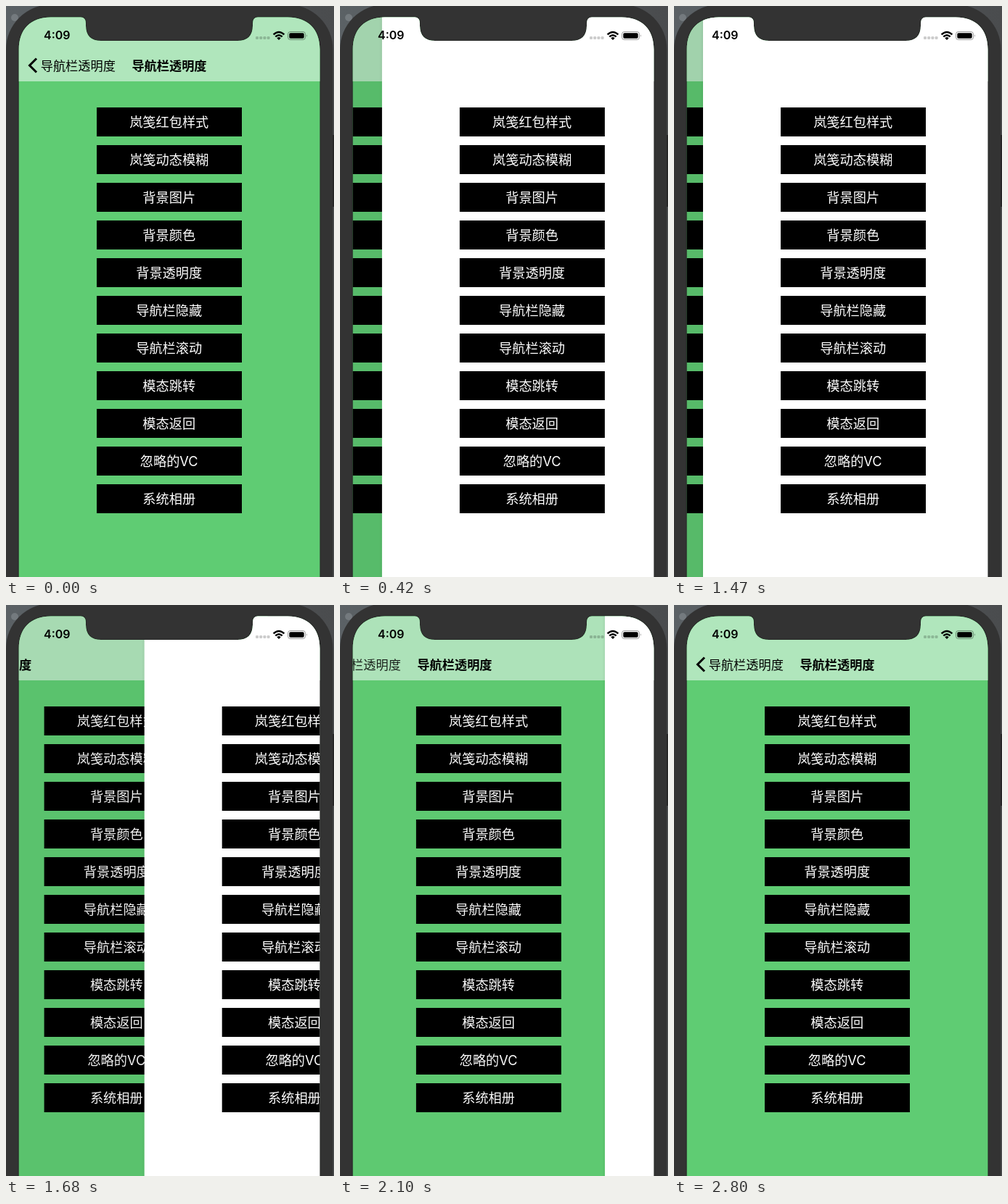
Animation, 452 px wide and 788 px high, one loop 2870 ms. Source, as an HTML page:

```html
<!DOCTYPE html>
<html lang="zh">
<head>
<meta charset="utf-8">
<title>Navigation transition</title>
<style>
  html, body { margin: 0; width: 100%; height: 100%; overflow: hidden; background: #4d5257; }
  svg { display: block; width: 100%; height: 100%; }
  text { font-family: Inter, "Noto Sans CJK SC", "Noto Sans CJK", sans-serif; }
  .button text { font-size: 18.2px; fill: #fff; text-anchor: middle; }
  .bar text { font-size: 17.2px; }
  .bar .title { font-weight: 700; text-anchor: middle; }
  .clock { font: 600 16px Inter, sans-serif; }
</style>
</head>
<body>
<svg viewBox="0 0 452 788">
  <defs>
    <linearGradient id="desk">
      <stop offset="0" stop-color="#5b6165"/>
      <stop offset="1" stop-color="#4a4c4e"/>
    </linearGradient>
    <linearGradient id="shade">
      <stop offset="0" stop-opacity="0"/>
      <stop offset="1" stop-opacity=".05"/>
    </linearGradient>
    <path id="outline" d="M17.7 800V60C17.7 32 34 15.5 62 15.5H103Q110 15.5 110 24V27Q110 48 131 48H319Q340 48 340 27V24Q340 15.5 347 15.5H388C416 15.5 432.5 32 432.5 60V800Z"/>
    <clipPath id="screen"><use href="#outline"/></clipPath>
    <g id="buttons"></g>
  </defs>

  <rect width="452" height="788" fill="url(#desk)"/>
  <circle cx="12" cy="16" r="5" fill="#747a7e"/>
  <rect x="449" y="178" width="3" height="99" fill="#222"/>
  <rect x="0" y="-2" width="450.5" height="860" rx="62" fill="#333"/>
  <use href="#outline" fill="none" stroke="#262826" stroke-width="2"/>

  <g clip-path="url(#screen)">
    <g id="greenPage">
      <rect x="17" width="416" height="788" fill="#5fcc73"/>
      <use href="#buttons"/>
    </g>
    <rect x="17" width="416" height="104" fill="#b0e6bc"/>
    <g id="barItems" class="bar">
      <g id="backItem">
        <path d="M42 72.5L32.5 82L42 91.5" fill="none" stroke="#000" stroke-width="3"/>
        <text x="47.7" y="88.5">导航栏透明度</text>
      </g>
      <text class="title" x="225" y="88.5">导航栏透明度</text>
    </g>
    <rect id="dim" x="17" width="416" height="788"/>
    <g id="whitePage">
      <rect x="14" width="4" height="788" fill="url(#shade)"/>
      <rect x="18" width="415" height="788" fill="#fff"/>
      <use href="#buttons"/>
    </g>
  </g>

  <text class="clock" x="52" y="46.3">4:09</text>
  <g fill-opacity=".2">
    <rect x="344" y="42" width="4" height="4" rx="1.3"/>
    <rect x="349.2" y="42" width="4" height="4" rx="1.3"/>
    <rect x="354.4" y="42" width="4" height="4" rx="1.3"/>
    <rect x="359.6" y="42" width="4" height="4" rx="1.3"/>
  </g>
  <g fill="none" stroke="#000" stroke-width="2.4">
    <path d="M368.6 39.4Q376 32.4 383.4 39.4"/>
    <path d="M371.3 42.4Q376 38 380.7 42.4"/>
  </g>
  <path d="M373.3 44.2Q376 42 378.7 44.2L376 47Z"/>
  <rect x="388.5" y="35.5" width="24" height="11" rx="3.3" fill="none" stroke="#000" stroke-opacity=".38"/>
  <rect x="390.3" y="37.3" width="20.4" height="7.4" rx="1.8"/>
  <path d="M414 39.2Q415.8 41 414 42.8Z" fill-opacity=".45"/>
</svg>
<script>
  const LOOP = 2870, TICK = 70, WIDTH = 414, PARALLAX = 0.3;
  const labels = ['岚笺红包样式', '岚笺动态模糊', '背景图片', '背景颜色', '背景透明度',
    '导航栏隐藏', '导航栏滚动', '模态跳转', '模态返回', '忽略的VC', '系统相册'];
  const byId = id => document.getElementById(id);
  const [greenPage, barItems, backItem, dim, whitePage] =
    ['greenPage', 'barItems', 'backItem', 'dim', 'whitePage'].map(byId);

  byId('buttons').innerHTML = labels.map((label, i) => `
    <g class="button" transform="translate(125 ${140 + 52 * i})">
      <rect width="200" height="40"/><text x="99.7" y="26.8">${label}</text>
    </g>`).join('');

  // Swipe-back drag: [time in ms, left edge of the white page]
  const drag = [[1400, 0], [1470, 22], [1680, 172.7], [1890, 290], [2100, 347],
    [2380, 360], [2520, 370], [2660, 398], [2800, WIDTH]];

  function pushOffset(time) {
    const x = Math.max(0, time - 180) * 0.0164;
    return WIDTH * (1 + x) * Math.exp(-x);   // critically damped spring
  }

  function dragOffset(time) {
    const next = drag.findIndex(point => point[0] >= time);
    if (next < 0) return WIDTH;
    const [t0, x0] = drag[next - 1], [t1, x1] = drag[next];
    return x0 + (x1 - x0) * (time - t0) / (t1 - t0);
  }

  function pageOffset(time) {
    if (time <= 700) return pushOffset(time);
    return time <= 1400 ? 0 : dragOffset(time);
  }

  const shift = (node, x) => node.setAttribute('transform', `translate(${x.toFixed(2)} 0)`);

  function draw(now) {
    const time = Math.floor(now % LOOP / TICK) * TICK;
    const offset = pageOffset(time), hidden = WIDTH - offset;
    shift(whitePage, offset);
    shift(greenPage, -PARALLAX * hidden);
    shift(barItems, -hidden);
    backItem.setAttribute('opacity', offset / WIDTH);
    dim.setAttribute('fill-opacity', 0.09 * hidden / WIDTH);
    whitePage.style.display = hidden < 0.5 ? 'none' : '';
  }

  const start = performance.now();
  function frame() {
    draw(performance.now() - start);
    requestAnimationFrame(frame);
  }
  frame();
</script>
</body>
</html>
```
